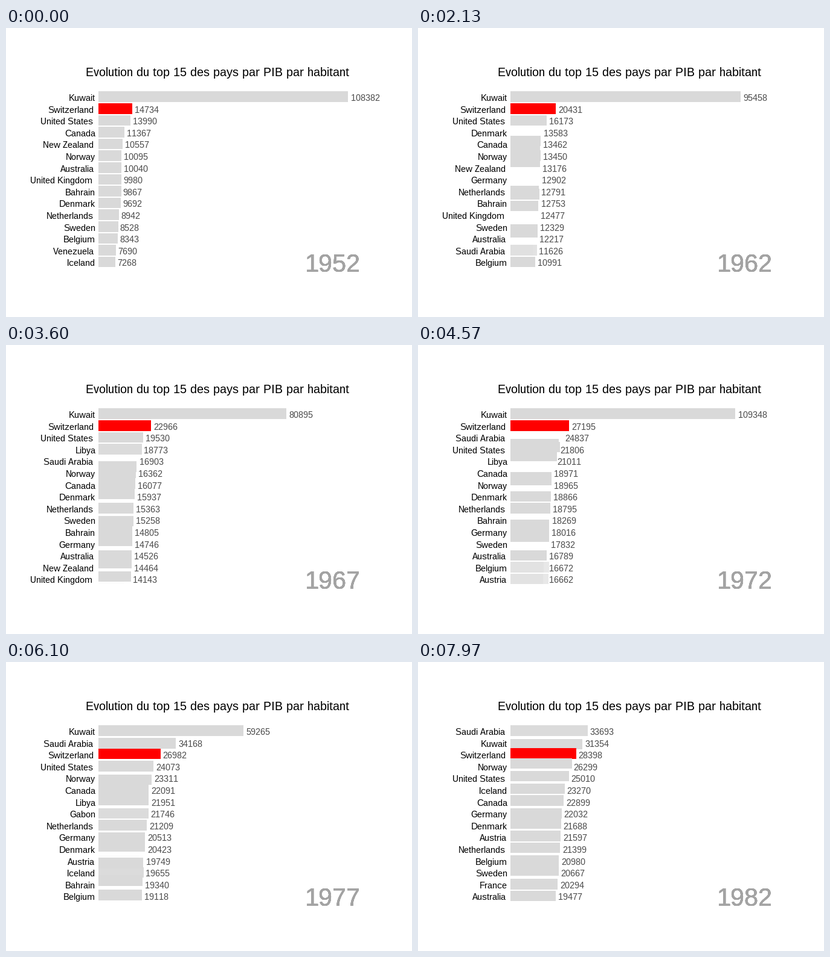
Write a matplotlib script that moves like this. It is 672 by 480 pixels and loops after 8 s.

```python
import matplotlib.pyplot as plt
from matplotlib.animation import FuncAnimation
from matplotlib.patches import Rectangle

plt.rcParams.update({
    "font.family": "Liberation Sans",
    "text.hinting": "native",
    "text.hinting_factor": 1,
    "text.kerning_factor": 6,
})

W, H, DPI = 672, 480, 96
INTERVAL, FRAMES = 20, 400
FPS = 30
START, MOVE, CYCLE = 6, 31, 37.91   # steps: first rest, movement, mean period
X0, SCALE = 153, 0.003811           # bar origin, pixels per unit
TOP, PITCH, BAR_H = 105.32, 19.6, 17.64
ROWS, MAX_BARS = 15, 24
GREY, RED = "#d9d9d9", "#ff0000"

TABLE = {
    1952: "Kuwait 108382, Switzerland 14734, United States 13990, Canada 11367,"
          "New Zealand 10557, Norway 10095, Australia 10040, United Kingdom 9980,"
          "Bahrain 9867, Denmark 9692, Netherlands 8942, Sweden 8528,"
          "Belgium 8343, Venezuela 7690, Iceland 7268",
    1957: "Kuwait 113523, Switzerland 17909, United States 14847, Canada 12490,"
          "New Zealand 12247, Norway 11654, Bahrain 11636, United Kingdom 11283,"
          "Netherlands 11276, Denmark 11100, Australia 10950, Germany 10188,"
          "Sweden 9912, Venezuela 9802, Belgium 9715",
    1962: "Kuwait 95458, Switzerland 20431, United States 16173, Denmark 13583,"
          "Canada 13462, Norway 13450, New Zealand 13176, Germany 12902,"
          "Netherlands 12791, Bahrain 12753, United Kingdom 12477, Sweden 12329,"
          "Australia 12217, Saudi Arabia 11626, Belgium 10991",
    1967: "Kuwait 80895, Switzerland 22966, United States 19530, Libya 18773,"
          "Saudi Arabia 16903, Norway 16362, Canada 16077, Denmark 15937,"
          "Netherlands 15363, Sweden 15258, Bahrain 14805, Germany 14746,"
          "Australia 14526, New Zealand 14464, United Kingdom 14143",
    1972: "Kuwait 109348, Switzerland 27195, Saudi Arabia 24837,"
          "United States 21806, Libya 21011, Canada 18971, Norway 18965,"
          "Denmark 18866, Netherlands 18795, Bahrain 18269, Germany 18016,"
          "Sweden 17832, Australia 16789, Belgium 16672, Austria 16662",
    1977: "Kuwait 59265, Saudi Arabia 34168, Switzerland 26982,"
          "United States 24073, Norway 23311, Canada 22091, Libya 21951,"
          "Gabon 21746, Netherlands 21209, Germany 20513, Denmark 20423,"
          "Austria 19749, Iceland 19655, Bahrain 19340, Belgium 19118",
    1982: "Saudi Arabia 33693, Kuwait 31354, Switzerland 28398, Norway 26299,"
          "United States 25010, Iceland 23270, Canada 22899, Germany 22032,"
          "Denmark 21688, Austria 21597, Netherlands 21399, Belgium 20980,"
          "Sweden 20667, France 20294, Australia 19477",
    1987: "Norway 31541, Switzerland 30282, United States 29884, Kuwait 28118,"
          "Iceland 26923, Canada 26627, Denmark 25116, Germany 24639,"
          "Austria 23688, Netherlands 23651, Sweden 23587, Belgium 22526,"
          "Japan 22376, France 22066, Australia 21889",
}


def parse(text):
    pairs = (item.strip().rsplit(" ", 1) for item in text.split(","))
    return [(name, int(value)) for name, value in pairs]


YEARS = list(TABLE)
STATES = [parse(text) for text in TABLE.values()]
RANKED = [{name: (rank, value) for rank, (name, value) in enumerate(state)}
          for state in STATES]
STARTS = [START + round(CYCLE * stage) for stage in range(len(STATES) - 1)]


def ease(p):
    return 2 * p * p if p < 0.5 else 1 - 2 * (1 - p) ** 2


def mix(a, b, e):
    return a + (b - a) * e


def px(size):
    return size * 72 / DPI


fig = plt.figure(figsize=(W / DPI, H / DPI), dpi=DPI, facecolor="white")
ax = fig.add_axes([0, 0, 1, 1])
ax.set_xlim(0, W)
ax.set_ylim(H, 0)
ax.axis("off")


def label(x, y, size, color, ha="left", text=""):
    return ax.text(x, y, text, fontsize=px(size), color=color, ha=ha,
                   va="baseline", zorder=3)


bars = [ax.add_patch(Rectangle((X0, TOP), 0, BAR_H, lw=0, snap=True, zorder=2))
        for _ in range(MAX_BARS)]
baselines = [121 + PITCH * row for row in range(ROWS)]
names = [label(148, y, 15, "black", "right") for y in baselines]
numbers = [label(X0, y, 15, "#4d4d4d") for y in baselines]
# stacked copies give the year its heavy, hard edge
years = [label(495, 405, 42, "#a3a3a3") for _ in range(8)]
label(349.5, 80, 20, "black", "center",
      "Evolution du top 15 des pays par PIB par habitant")


def bar_list(old, new, e):
    """Name, rank, value and opacity of each bar, back to front."""
    for name, (rank, value) in old.items():
        if name in new:
            rank2, value2 = new[name]
            yield name, mix(rank, rank2, e), mix(value, value2, e), 1
        else:
            yield name, rank, value, 1 - e
    for name, (rank, value) in new.items():
        if name not in old:
            yield name, rank, value, e


def update(i):
    step = int((i * INTERVAL + 14) * FPS / 1000)
    stage = max(sum(step >= start for start in STARTS) - 1, 0)
    p = (step - STARTS[stage]) / MOVE
    e = ease(min(max(p, 0), 1))
    shown = stage + (e > 0.5)

    for bar in bars:
        bar.set_visible(False)
    moving = bar_list(RANKED[stage], RANKED[stage + 1], e)
    for bar, (name, rank, value, alpha) in zip(bars, moving):
        bar.set_visible(True)
        bar.set_y(TOP + PITCH * rank)
        bar.set_width(value * SCALE)
        bar.set_facecolor(RED if name == "Switzerland" else GREY)
        bar.set_alpha(alpha)

    for row, (name, value) in enumerate(STATES[shown]):
        names[row].set_text(name)
        names[row].set_x(151.8 - 0.62 * len(name))
        end = mix(STATES[stage][row][1], STATES[stage + 1][row][1], e)
        numbers[row].set_text(str(value))
        numbers[row].set_x(X0 + end * SCALE + 0.8 * len(str(value)))

    for year in years:
        year.set_text(str(YEARS[shown]))
    return bars + names + numbers + years


anim = FuncAnimation(fig, update, frames=FRAMES, interval=INTERVAL,
                     repeat=True, repeat_delay=0, blit=False)
plt.show()
```
